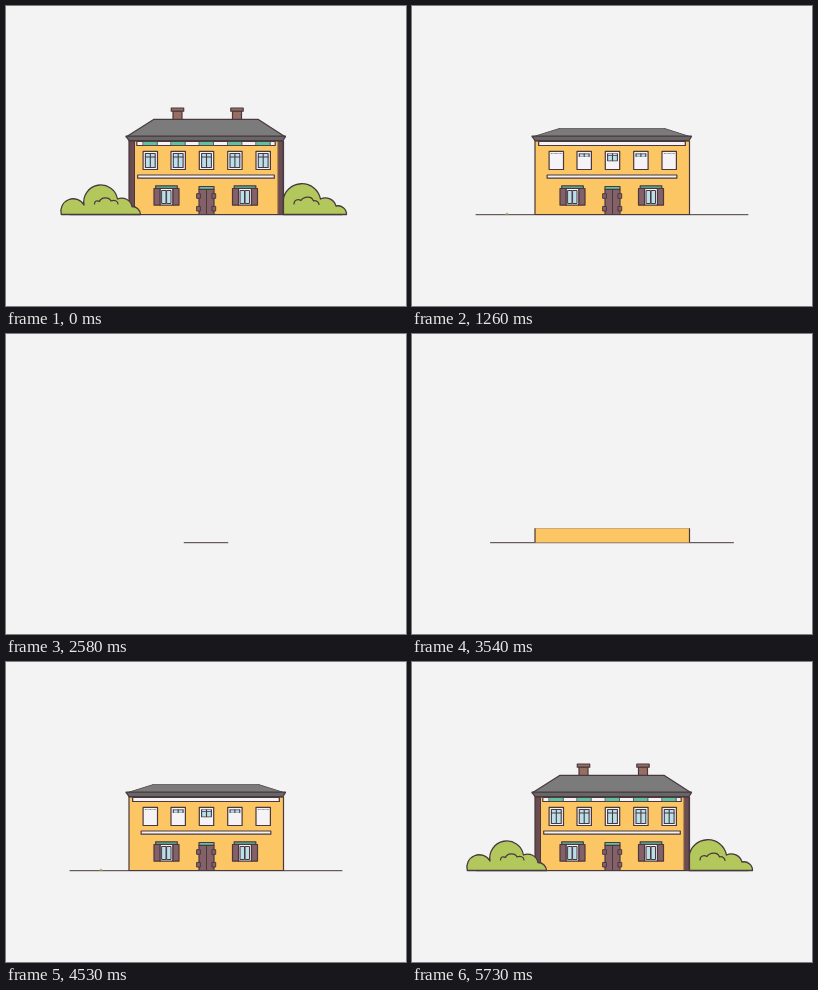
An HTML page with a canvas for the animation above (5.82 s loop, 400 by 300 pixels).

```html
<!DOCTYPE html>
<html lang="en">
<head>
<meta charset="utf-8">
<title>House</title>
<style>
html, body { margin: 0; width: 100%; height: 100%; overflow: hidden; background: #f3f3f3; }
canvas { display: block; width: 400px; height: 300px; }
</style>
</head>
<body>
<canvas id="stage"></canvas>
<script>
const LOOP = 5820, STEP = 30, MIDDLE = 2895;
const INK = '#49393f', WALL = '#fdc664', WHITE = '#f5f3f5', GLASS = '#b9dfea', TEAL = '#62c0a0',
  MAUVE = '#846069', PIPE = '#6a4c52', BRICK = '#976f62', ROOF = '#7b7b7b', EAVE = '#676767', LEAF = '#b3c85c';

const canvas = document.getElementById('stage');
const ctx = canvas.getContext('2d');
const dpr = window.devicePixelRatio || 1;
canvas.width = 400 * dpr;
canvas.height = 300 * dpr;

let now = 0; // build time: 0 is empty, MIDDLE is the finished house

const clamp = x => Math.max(0, Math.min(1, x));
const smooth = x => x * x * (3 - 2 * x);
const cubic = x => x < .5 ? 4 * x ** 3 : 1 - 4 * (1 - x) ** 3;
const grow = (start, end) => smooth(clamp((now - start) / (end - start)));
// Grows to the overshoot k at peak, then settles at 1
const pop = (start, peak, end, k) =>
  now < peak ? k * grow(start, peak) : k + (1 - k) * grow(peak, end);

function shape(d, fill, weight = 1.2) {
  const path = new Path2D(d);
  if (fill) {
    ctx.fillStyle = fill;
    ctx.fill(path);
  }
  if (weight) {
    ctx.strokeStyle = INK;
    ctx.lineWidth = weight;
    ctx.lineJoin = ctx.lineCap = 'round';
    ctx.stroke(path);
  }
}

const box = (x, y, w, h, fill, weight) => shape(`M${x} ${y}h${w}v${h}h${-w}z`, fill, weight);

// Scales a part about the point x, y
function part(x, y, sx, sy, draw) {
  if (sx < .01 || sy < .01) return;
  ctx.save();
  ctx.translate(x, y);
  ctx.scale(sx, sy);
  ctx.translate(-x, -y);
  draw();
  ctx.restore();
}

function bush(x, size, outline, curl) {
  part(x, 208.5, size, size, () => {
    shape(outline, LEAF, 1.3);
    shape(curl, null, 1.2);
  });
}

function rightBush() {
  bush(300, pop(1940, 2205, 2700, 1.12),
    'M277 208.5V194.5A19 19 0 0 1 314.5 193A11 11 0 0 1 330 200A8.5 8.5 0 0 1 340.5 208.5Z',
    'M288 198C288 194 292 192.5 295 194.5C298 190 306 190 307.5 195C310 194 313 196 313 198.5');
}

function leftBush() {
  bush(95, pop(1600, 1860, 2280, 1.12),
    'M55.3 208.5A12.4 12.4 0 0 1 78 199A17 17 0 0 1 111.5 193A10.5 10.5 0 0 1 126 200.5A8.5 8.5 0 0 1 134.5 208.5Z',
    'M88.5 198C88.5 195 91 194 93.5 195.5C95 191 103 190.5 105 195C108 193.5 112 195 112 198');
}

function chimney(x, size) {
  part(x, 113, size, size, () => {
    box(x - 4.5, 105, 9, 8.5, BRICK);
    box(x - 6.2, 102, 12.4, 3.2, BRICK);
  });
}

function upperWindow(x, order) {
  const delay = order * 60;
  part(x, 163.5, 1, grow(955 + delay, 1255 + delay), () => box(x - 7.2, 145.3, 14.4, 18.2, WHITE));
  part(x, 147.5, 1, grow(1480 + delay, 1780 + delay), () => {
    box(x - 4.9, 147.5, 9.8, 14, GLASS, 1.1);
    shape(`M${x} 147.5v14M${x - 4.9} 151h9.8`, null, 1.1);
  });
  const cap = 1800 + delay;
  part(x, 135.5, 1, pop(cap, cap + 200, cap + 330, 1.06), () => box(x - 7, 135.5, 14, 4, TEAL, .8));
}

function lowerWindow(x) {
  part(x, 199.5, 1, grow(800, 1050), () => {
    box(x - 6.5, 182.5, 13, 16.6, WHITE);
    box(x - 4.5, 184.5, 4, 13, GLASS, 1);
    box(x + .5, 184.5, 4, 13, GLASS, 1);
  });
  const open = grow(960, 1370);
  for (const side of [-1, 1])
    part(x + side * 6.5, 190, open, 1, () => box(x + side * 9.5 - 3, 182.5, 6, 16.6, MAUVE));
  part(x, 182, grow(1300, 1600), 1, () => box(x - 10.8, 179.8, 21.6, 2.6, TEAL));
}

function door() {
  part(200.5, 208.5, 1, grow(760, 1020), () => {
    box(193, 183.5, 15, 25, MAUVE);
    shape('M200.5 183.5v25', null, 1);
  });
  const size = grow(920, 1110);
  for (const x of [192.7, 208])
    for (const y of [190, 202.7])
      part(x, y, size, size, () => box(x - 1.7, y - 2.3, 3.4, 4.6, MAUVE, 1));
  part(200.5, 183, grow(1300, 1600), 1, () => box(193, 180.5, 15, 2.8, TEAL));
}

function walls() {
  part(200, 208.5, 1, pop(540, 920, 1080, 1.033), () => box(123, 135, 154.5, 73.5, WALL));
  part(200, 208.5, 1, grow(1750, 2100), () => {
    box(124, 135, 4.5, 73.5, PIPE, 1);
    box(272.5, 135, 4.5, 73.5, PIPE, 1);
  });
  part(200, 137, pop(1330, 1635, 1820, 1.06), 1, () => box(130.8, 135.5, 138.4, 4, WHITE));
  part(200, 171, grow(1030, 1730), 1, () => box(131.7, 169, 136.6, 3.2, WHITE));
}

function roof() {
  part(200, 131, 1, grow(1433, 1838), () => shape('M148 113.3H252L279.5 131H120Z', ROOF));
  part(199.8, 132, pop(1005, 1150, 1400, 1.05), 1, () => shape('M120 130.2H279.5L277 134.7H123Z', EAVE));
}

function ground() {
  const half = 136 * cubic(clamp(now / 920));
  if (half > 0) shape(`M${200 - half} 208.7H${200 + half}`, null, 1);
}

function frame() {
  const time = Math.floor(performance.now() % LOOP / STEP) * STEP;
  now = Math.abs(MIDDLE - time);
  ctx.setTransform(dpr, 0, 0, dpr, 0, 0);
  ctx.fillStyle = '#f3f3f3';
  ctx.fillRect(0, 0, 400, 300);

  ground();
  rightBush();
  walls();
  [144.3, 172.2, 200.5, 228.9, 257.2].forEach((x, i) => upperWindow(x, Math.abs(i - 2)));
  lowerWindow(160.5);
  lowerWindow(239);
  door();
  chimney(171.5, pop(2250, 2500, 2750, 1.06));
  chimney(231, pop(2000, 2200, 2450, 1.06));
  roof();
  leftBush();
  requestAnimationFrame(frame);
}
frame();
</script>
</body>
</html>
```
